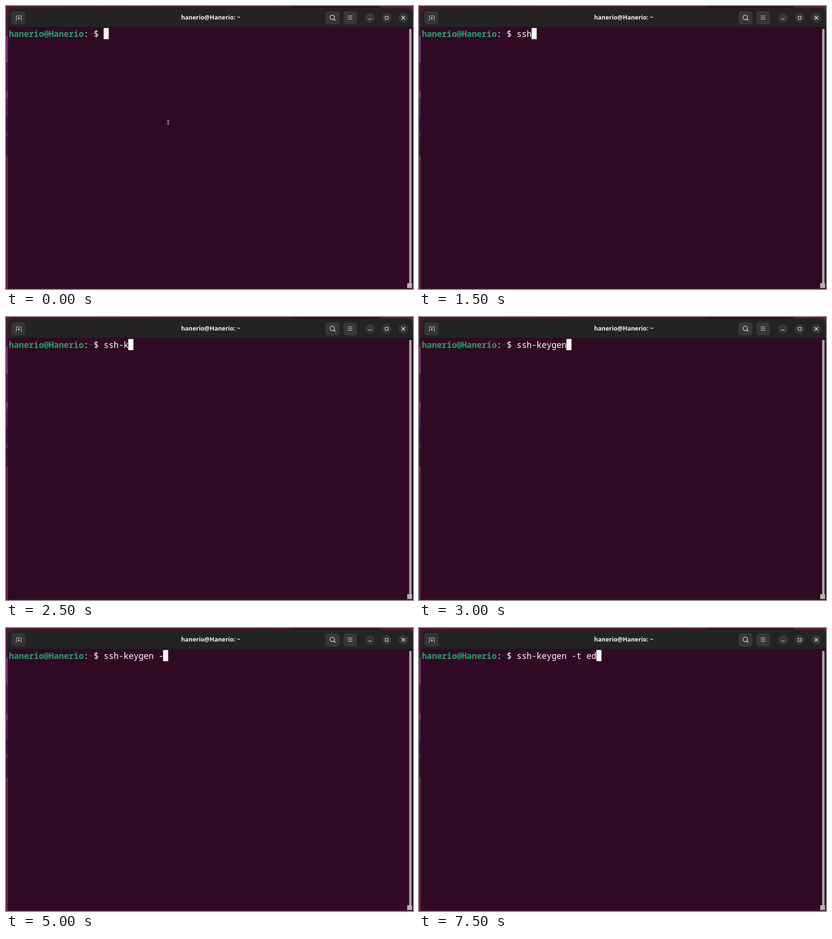
Recreate the animation shown at these times as an HTML page with a canvas. Size 842x585 px, loop 8 s.

```html
<!DOCTYPE html>
<html lang="en">
<head>
<meta charset="utf-8">
<title>Terminal</title>
<style>
  html, body { margin: 0; width: 100%; height: 100%; overflow: hidden; background: #300a24; }
  canvas { display: block; }
</style>
</head>
<body>
<canvas id="stage" width="842" height="585"></canvas>
<script>
const ctx = document.getElementById("stage").getContext("2d");
const LOOP = 8000;
const USER = "hanerio";
const HOST = "Hanerio";
const COMMAND = "ssh-keygen -t ed";
const CELL = 10.32;
const LEFT = 6;
const BASELINE = 64;
const MONO = '"Noto Sans Mono", monospace';

// [time, typed characters, cursor visible]
const TYPING = [
  [0, 0, true], [1250, 2, true], [1500, 3, true], [2000, 4, true],
  [2500, 5, true], [2750, 7, true], [3000, 10, true], [3750, 11, true],
  [4250, 11, false], [5000, 12, true], [5500, 13, true], [5750, 14, true],
  [6250, 14, false], [6750, 15, true], [7000, 16, true]
];

// [time, x, y]; the pointer hides once typing starts
const POINTER = [[0, 335, 241], [250, 232, 347], [1250, null, null]];

const at = (steps, time) => steps.filter(step => step[0] <= time).pop();

function rect(x, y, w, h, color) {
  ctx.fillStyle = color;
  ctx.fillRect(x, y, w, h);
}

function rounded(x, y, w, h, radius, color) {
  ctx.fillStyle = color;
  ctx.beginPath();
  ctx.roundRect(x, y, w, h, radius);
  ctx.fill();
}

function line(points, color = "#f2f2f2", width = 1) {
  ctx.strokeStyle = color;
  ctx.lineWidth = width;
  ctx.beginPath();
  points.forEach(([x, y]) => ctx.lineTo(x, y));
  ctx.stroke();
}

function circle(x, y, radius) {
  ctx.beginPath();
  ctx.arc(x, y, radius, 0, Math.PI * 2);
}

function drawWallpaper() {
  const bands = [
    [0, "#501638"], [62, "#75306a"], [117, "#571545"], [176, "#772c6a"],
    [190, "#5b194f"], [230, "#480c4c"], [262, "#62233f"], [270, "#471035"],
    [309, "#6a2848"], [322, "#66213f"]
  ];
  bands.forEach(([y, color]) => rect(0, y, 842, 585 - y, color));
  const sky = ctx.createLinearGradient(0, 0, 595, 0);
  sky.addColorStop(0, "#55183a");
  sky.addColorStop(1, "#4a1233");
  rect(0, 0, 595, 16, sky);
  rect(595, 0, 180, 16, "#370a25");
  rect(775, 0, 67, 16, "#621d3e");
  rect(12, 3, 822, 1, "#331021");
}

function drawTitleBar() {
  rounded(4, 4, 838, 44, [11, 11, 0, 0], "#232323");
  rect(14, 4, 818, 1, "#2a2829");
  rect(4, 43, 838, 1, "#1b171a");

  rounded(11, 11, 29, 27, 5, "#353535");
  rounded(661, 11, 29, 27, 5, "#373737");
  rounded(698, 11, 28, 27, 5, "#373737");
  ctx.fillStyle = "#373737";
  for (const x of [753, 787.5, 822]) {
    circle(x, 24.5, 10);
    ctx.fill();
  }

  line([[20, 29.5], [21.5, 29.5], [21.5, 20.5], [31.5, 20.5], [31.5, 29.5], [33, 29.5]], "#d4d4d4");
  line([[24, 25.5], [29, 25.5]]);
  line([[26.5, 23], [26.5, 28]]);

  ctx.strokeStyle = "#f0f0f0";
  ctx.lineWidth = 1.2;
  circle(675, 23.5, 4.6);
  ctx.stroke();
  line([[678.3, 26.8], [681.5, 30]], "#f0f0f0", 1.3);
  for (const y of [20.5, 24, 27.5]) line([[707, y], [716.5, y]], "#e2e2e2");

  line([[749.5, 27], [756.5, 27]]);
  ctx.strokeRect(784.5, 21.5, 6, 6);
  line([[818.5, 21], [825.5, 28]], "#f2f2f2", 1.3);
  line([[825.5, 21], [818.5, 28]], "#f2f2f2", 1.3);

  ctx.font = 'bold 12.4px "Noto Sans", sans-serif';
  ctx.textAlign = "center";
  ctx.fillStyle = "#f4f4f4";
  ctx.fillText(`${USER}@${HOST}: ~`, 423.5, 28);
}

function drawTerminal() {
  rect(4, 44, 838, 540, "#300a24");
  rect(4, 44, 1, 540, "#260a1e");
  rect(4, 583, 838, 1, "#2c0c20");
  rect(4, 584, 838, 1, "#4a1830");
  rounded(834, 47, 5, 530, 2.5, "#a9a4a8");
  rect(830, 573, 10, 10, "#b5b1b4");
}

function drawText(text, column, color, weight = 400) {
  ctx.font = `${weight} 17.2px ${MONO}`;
  ctx.textAlign = "left";
  ctx.fillStyle = color;
  ctx.fillText(text, LEFT + column * CELL, BASELINE);
}

function drawPrompt(time) {
  const name = `${USER}@${HOST}`;
  const start = name.length + 4;
  const [, count, cursor] = at(TYPING, time);
  drawText(name, 0, "#26a269", 700);
  drawText(":", name.length, "#ffffff");
  drawText("~", name.length + 1, "#12488b", 700);
  drawText("$", name.length + 2, "#ffffff");
  drawText(COMMAND.slice(0, count), start, "#ffffff");
  if (cursor) rect(Math.floor(LEFT + (start + count) * CELL), 45.5, 10.5, 23, "#ffffff");
}

function drawPointer(time) {
  const [, x, y] = at(POINTER, time);
  if (x === null) return;
  rect(x - 2, y - 4, 5, 1, "#d8d0d6");
  rect(x, y - 4, 1, 8, "#d8d0d6");
  rect(x - 2, y + 3, 5, 1, "#d8d0d6");
}

function draw(now) {
  const time = now % LOOP;
  drawWallpaper();
  drawTitleBar();
  drawTerminal();
  drawPrompt(time);
  drawPointer(time);
  requestAnimationFrame(draw);
}

requestAnimationFrame(draw);
</script>
</body>
</html>
```
